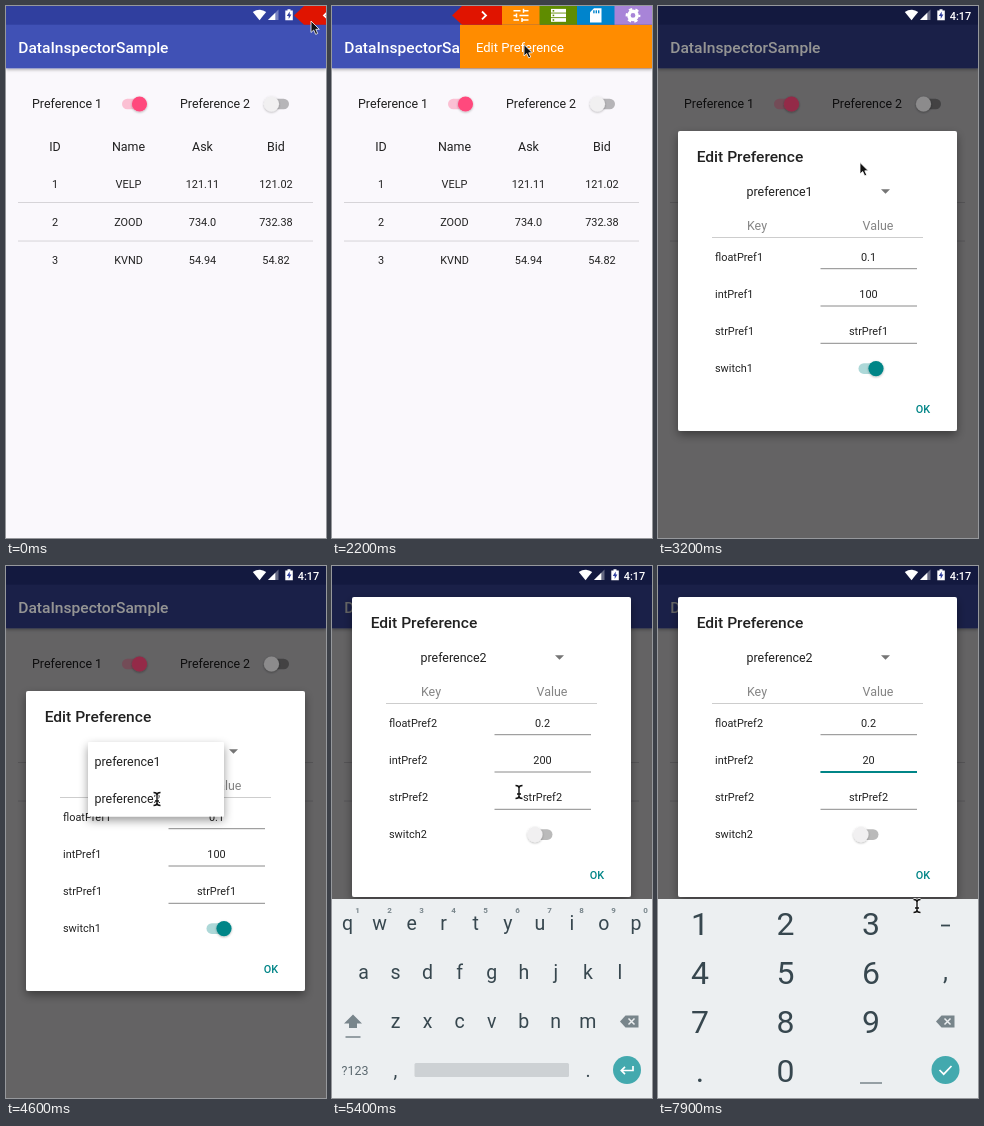
Write an HTML page that moves like this. It is 320 by 532 pixels and loops after 8 s.

```html
<!DOCTYPE html>
<html lang="en">
<head>
<meta charset="utf-8">
<title>DataInspectorSample</title>
<style>
  html, body { margin: 0; width: 100%; height: 100%; overflow: hidden; background: #faf8fc; }
  svg { display: block; width: 100%; height: 100%; font-family: Roboto, sans-serif; }
</style>
</head>
<body>
<svg id="stage" viewBox="0 0 320 532"></svg>
<script>
const SP14 = 10.9, SP16 = 12.45, SP20 = 15.56;
const TEAL = '#008587', INK = '#37474f', KEY = '#78858b', ORANGE = '#ff8c00';
const LOOP = 8000;

// y is the middle of the capitals
function text(s, x, y, size, fill = '#212121', anchor = 'middle', extra = '') {
  return `<text x="${x}" y="${y + size * 0.355}" font-size="${size}" fill="${fill}" text-anchor="${anchor}" ${extra}>${s}</text>`;
}
const rect = (x, y, w, h, fill, extra = '') =>
  `<rect x="${x}" y="${y}" width="${w}" height="${h}" fill="${fill}" ${extra}/>`;
const line = (x1, x2, y, color, w = 1) =>
  `<path d="M${x1} ${y}H${x2}" stroke="${color}" stroke-width="${w}"/>`;
const group = (id, body, extra = '') => `<g id="${id}" ${extra}>${body}</g>`;

function toggle(x, y, on, color) {
  const track = on ? color : '#000';
  return rect(x - 10, y - 5.3, 20, 10.6, track, `rx="5.3" opacity="${on ? 0.32 : 0.27}"`) +
    `<circle cx="${x + (on ? 7.5 : -7.5)}" cy="${y}" r="7.6" fill="${on ? color : '#f1f0f1'}" filter="url(#knob)"/>`;
}

function appScreen() {
  const cols = [49, 122.5, 196.5, 270];
  const rows = [
    ['1', 'VELP', '121.11', '121.02'],
    ['2', 'ZOOD', '734.0', '732.38'],
    ['3', 'KVND', '54.94', '54.82']
  ];
  const head = ['ID', 'Name', 'Ask', 'Bid'].map((s, i) => text(s, cols[i], 140.5, SP16)).join('');
  const cells = rows.map((r, j) => r.map((s, i) => text(s, cols[i], 177.7 + j * 38.2, SP14)).join('')).join('');
  return rect(0, 0, 320, 532, '#faf8fc') +
    rect(0, 10, 320, 52.3, '#3f51b5', 'filter="url(#bar)"') +
    rect(0, 0, 320, 18.7, '#303f9f') +
    text('Preference 1', 26, 98, SP16, '#212121', 'start') +
    text('Preference 2', 174, 98, SP16, '#212121', 'start') +
    group('bright',
      text('DataInspectorSample', 12.3, 41, SP20, '#fff', 'start', 'font-weight="500"') +
      toggle(126, 98, true, '#ff4a7d') + toggle(273, 98, false)) +
    head + cells + line(12, 307, 196.5, '#d6d4d8') + line(12, 307, 235, '#d6d4d8');
}

function statusIcons() {
  return `<g fill="#fff">
    <path d="M253.5 14.2L246.8 6Q253.5 1.4 260.2 6Z"/>
    <path d="M272.5 3.6V14H262Z" opacity=".35"/><path d="M269.3 6.8V14H262Z"/>
    <path d="M279.3 4.5H281.5V3.2H284.5V4.5H286.8V14.2H279.3Z"/></g>
    <path d="M283.7 5.6L280.8 10H282.7V13L285.4 8.6H283.7Z" fill="#303f9f"/>` +
    text('4:17', 302.5, 9.7, SP14, '#fff', 'middle', 'font-weight="500"');
}

function toolbar() {
  const tiles = [ORANGE, '#5f8c00', '#0084cc', '#a884d8']
    .map((c, i) => rect(170 + i * 37.5, 0, 38, 18.7, c)).join('');
  const tune = '<path d="M181.500 4.800H188.500M191.500 4.800H196.500M181.500 9.400H184.500M187.500 9.400H196.500M181.500 14H187M190 14H196.500M191.500 2.800V6.800M184.500 7.400V11.400M190 12V16" stroke="#fff" stroke-width="1.500"/>'.replace(/00\b/g, m => m);
  const list = [4.8, 9.4, 14].map(y =>
    rect(219, y - 1.9, 15, 3.7, '#fff') + rect(220.6, y - 0.8, 1.6, 1.6, '#5f8c00')).join('');
  const card = '<path d="M262 2.200H269.500V16.500H258V6.200Z" fill="#fff"/>' +
    [261.2, 263.6, 266].map(x => rect(x, 4.3, 1.4, 3, '#0084cc')).join('');
  const gear = '<g fill="none" stroke="#fff"><circle cx="301" cy="9.400" r="4.100" stroke-width="3.400"/>' +
    '<circle cx="301" cy="9.400" r="6.300" stroke-width="2.200" stroke-dasharray="3.300 3.300" stroke-dashoffset="1.600"/></g>';
  return `<path d="M120 9.4L130 0H170.500V18.700H130Z" fill="#e01400"/>` + tiles +
    '<path id="chevron" fill="none" stroke="#fff" stroke-width="1.800"/>' + tune + list + card + gear;
}

function dialog() {
  const rows = ['floatPref', 'intPref', 'strPref', 'switch'];
  const ys = [250.7, 288, 325.3, 362.6];
  return rect(20, 125, 279, 300, '#fff', 'rx="2" filter="url(#lift)"') +
    text('Edit Preference', 38.700, 150, SP20, '#212121', 'start', 'font-weight="500"') +
    text('', 88.5, 185.500, SP16, '#212121', 'start', 'id="spinner"') +
    '<path d="M223 183.300H232L227.500 187.800Z" fill="#757575"/>' +
    text('Key', 99, 219.5, SP16, '#858585') + text('Value', 220, 219.5, SP16, '#858585') +
    line(54, 265, 231.5, '#cdcdcd') +
    rows.map((s, i) => text('', 57, ys[i], SP14, '#212121', 'start', `id="label${i}" data-name="${s}"`)).join('') +
    [0, 1, 2].map(i => text('', 210.5, ys[i], SP14, '#212121', 'middle', `id="value${i}"`) +
      line(162.5, 259, ys[i] + 12, '#8a8a8a')).join('') +
    group('focus', line(162.5, 259, 300, TEAL, 2)) +
    `<path id="caret" stroke="${TEAL}" stroke-width="1.500"/>` +
    group('on', toggle(210.5, 362.6, true, TEAL)) + group('off', toggle(210.5, 362.6, false)) +
    text('OK', 265, 403.5, SP14, TEAL, 'middle', 'font-weight="500"');
}

const backspace = x => `<path d="M${x - 9.5} 455.500L${x - 4} 449.500H${x + 9}V461.500H${x - 4}Z" fill="${KEY}"/>` +
  `<path d="M${x - 1} 452.500l6 6m0 -6l-6 6" stroke="#eceff1" stroke-width="1.500"/>`;
const roundKey = (x, icon) => `<circle cx="${x}" cy="504" r="14" fill="#43a9ae"/>` +
  `<path d="${icon}" fill="none" stroke="#fff" stroke-width="1.700"/>`;

function letters() {
  const row = (s, x, y) => [...s].map((c, i) =>
    `<text x="${x + i * 32.05}" y="${y}" font-size="19.500" fill="${INK}" text-anchor="middle">${c}</text>`).join('');
  const hints = [...'1234567890'].map((c, i) =>
    text(c, 25.5 + i * 32, 344, 8, KEY, 'middle', 'font-weight="700"')).join('');
  return row('qwertyuiop', 15.500, 363.5) + hints + row('asdfghjkl', 31.5, 412.5) + row('zxcvbnm', 63.5, 461.5) +
    `<path d="M21 448.500L30 457.500H25V462H17V457.500H12Z" fill="${KEY}"/>` + line(13.5, 28.5, 471, KEY, 1.5) +
    backspace(297.5) + text('?123', 23, 504.5, SP16, '#5b686f') +
    rect(82.5, 497, 154.5, 14, '#cdd1d4', 'rx="1.500"') + row(',', 63.5, 511) + row('.', 256, 511) +
    roundKey(295, 'M301 500V504.500H289.500M293 500.800L289.300 504.500L293 508.200');
}

function numbers() {
  const keys = ['123', '456', '789', '.0'].map((s, j) => [...s].map((c, i) =>
    text(c, 42 + i * 85.5, 358 + j * 48.8, 32, INK)).join('')).join('');
  return keys + line(202, 224, 517, KEY, 1.5) + line(283, 292, 359.5, INK, 1.8) +
    text(',', 287.5, 405, 25, INK) + backspace(287.5) + roundKey(287.5, 'M281.500 504L285.700 508.200L293.500 500');
}

const shadow = (id, dy, blur, alpha) =>
  `<filter id="${id}" x="-20%" y="-20%" width="140%" height="150%"><feDropShadow dx="0" dy="${dy}" stdDeviation="${blur}" flood-opacity="${alpha}"/></filter>`;

const beam = 'M-3.500 -6.500Q0 -6.500 0 -4Q0 -6.500 3.500 -6.500M0 -5V5M-3.500 6.500Q0 6.500 0 4Q0 6.500 3.500 6.500M-2 2H2';

document.getElementById('stage').innerHTML =
  '<defs>' + shadow('knob', 0.8, 0.8, 0.3) + shadow('bar', 1.5, 1.5, 0.3) + shadow('lift', 4, 5, 0.4) + '</defs>' +
  appScreen() + rect(0, 0, 320, 532, '#000', 'id="dim"') +
  '<use id="glow" href="#bright"/>' + statusIcons() +
  group('dialog', dialog()) +
  group('drop', rect(82, 176, 136, 74.500, '#fff', 'rx="1.500" filter="url(#lift)"') +
    text('preference1', 88.5, 195.5, SP16, '#212121', 'start') +
    text('preference2', 88.5, 232.800, SP16, '#212121', 'start')) +
  group('keyboard', rect(0, 333, 320, 199, '#eceff1') + group('letters', letters()) + group('numbers', numbers())) +
  group('tip', rect(128, 18.7, 192, 43.600, ORANGE) + text('Edit Preference', 144, 41, 13, '#fff', 'start')) +
  group('toolbar', toolbar()) +
  group('arrow', '<path d="M0 0V11.500L2.700 9L4.700 13.400L6.700 12.500L4.800 8.300H8.300Z" fill="#111" stroke="#fff" stroke-width=".8"/>') +
  group('beam', `<path d="${beam}" fill="none" stroke="#fff" stroke-width="3"/><path d="${beam}" fill="none" stroke="#111" stroke-width="1.400"/>`);

const el = {};
document.querySelectorAll('svg [id]').forEach(n => el[n.id] = n);

// piecewise linear value: at(t, time, value, time, value, ...)
function at(t, ...k) {
  if (t <= k[0]) return k[1];
  for (let i = 2; i < k.length; i += 2) {
    if (t <= k[i]) return k[i - 1] + (k[i + 1] - k[i - 1]) * (t - k[i - 2]) / (k[i] - k[i - 2]);
  }
  return k[k.length - 1];
}
const show = (n, on) => n.setAttribute('display', on ? 'inline' : 'none');
const fade = (n, a) => { n.setAttribute('opacity', a); show(n, a > 0); };
const move = (n, x, y) => n.setAttribute('transform', `translate(${x} ${y})`);
const put = (n, s) => { if (n.textContent !== s) n.textContent = s; };

const pointer = [
  [100, 305, 15], [200, 297, 12], [500, 297, 12], [800, 255, 31], [1200, 191, 11], [1500, 189, 7],
  [1700, 189, 8], [2100, 192, 38.5], [2600, 192, 38.5], [3200, 202, 156.5], [3500, 159, 187],
  [4000, 159, 187], [4500, 151, 233], [5000, 151, 233], [5400, 187, 226], [5700, 211, 195],
  [6400, 211, 195], [7000, 286, 456], [7500, 286, 456], [7900, 259, 340]
];
const pointerX = pointer.flatMap(p => [p[0], p[1]]);
const pointerY = pointer.flatMap(p => [p[0], p[2]]);

function draw(t) {
  const slide = t < 2300
    ? at(t, 400, 168, 500, 120, 600, 58, 700, 15, 800, 0)
    : at(t, 2300, 0, 2400, 20, 2500, 62, 2600, 114, 2700, 170, 2800, 210);
  move(el.toolbar, slide, 0);
  const dir = t >= 800 && t < 2400 ? 1 : -1;
  el.chevron.setAttribute('d', `M${152 - 2 * dir} 5.500L${152 + 2 * dir} 9.400L${152 - 2 * dir} 13.300`);

  fade(el.tip, t < 2300 ? at(t, 1300, 0, 1500, 0.3, 1700, 1) : at(t, 2300, 1, 2500, 0));
  move(el.tip, at(t, 1300, 14, 1500, 5, 1600, 0), 0);

  const dim = at(t, 2400, 0, 2600, 0.22, 2900, 0.6);
  fade(el.dim, dim);
  fade(el.glow, t < 4900 ? dim * 0.5 : 0);
  fade(el.dialog, at(t, 2400, 0, 2500, 0.5, 2600, 0.89, 2700, 1));
  move(el.dialog, 0, at(t, 5000, 0, 5200, -94));

  const second = t >= 4900;
  const set = second ? '2' : '1';
  put(el.spinner, 'preference' + set);
  for (let i = 0; i < 4; i++) put(el['label' + i], el['label' + i].dataset.name + set);
  put(el.value0, '0.' + set);
  put(el.value1, t >= 7300 ? '20' : set + '00');
  put(el.value2, 'strPref' + set);
  show(el.on, !second);
  show(el.off, second);

  const focused = t >= 5900;
  show(el.focus, focused);
  show(el.caret, focused && t < 7500 && (t - 5900) % 1000 < 500);
  el.caret.setAttribute('d', `M${t >= 7300 ? 217.5 : 220.5} 280.500V295.500`);

  fade(el.drop, t < 4700 ? at(t, 3800, 0, 4000, 1) : at(t, 4700, 1, 4900, 0));
  show(el.keyboard, t > 5000);
  move(el.keyboard, 0, at(t, 5000, 199, 5100, 110, 5200, 35, 5300, 0));
  show(el.letters, t < 6200);
  show(el.numbers, t >= 6200);

  const x = at(t, ...pointerX), y = at(t, ...pointerY);
  move(el.arrow, x, y);
  move(el.beam, x, y);
  show(el.arrow, t < 4200);
  show(el.beam, t >= 4200);
}

// the picture advances ten times a second, with a few longer holds
function hold(t) {
  const s = Math.floor(t / 100) * 100;
  if (s === 3600 || s === 3700) return 3500;
  return [300, 1300, 2300, 4700].includes(s) ? s - 100 : s;
}

const start = performance.now();
function tick() {
  draw(hold((performance.now() - start) % LOOP));
  requestAnimationFrame(tick);
}
tick();
</script>
</body>
</html>
```
